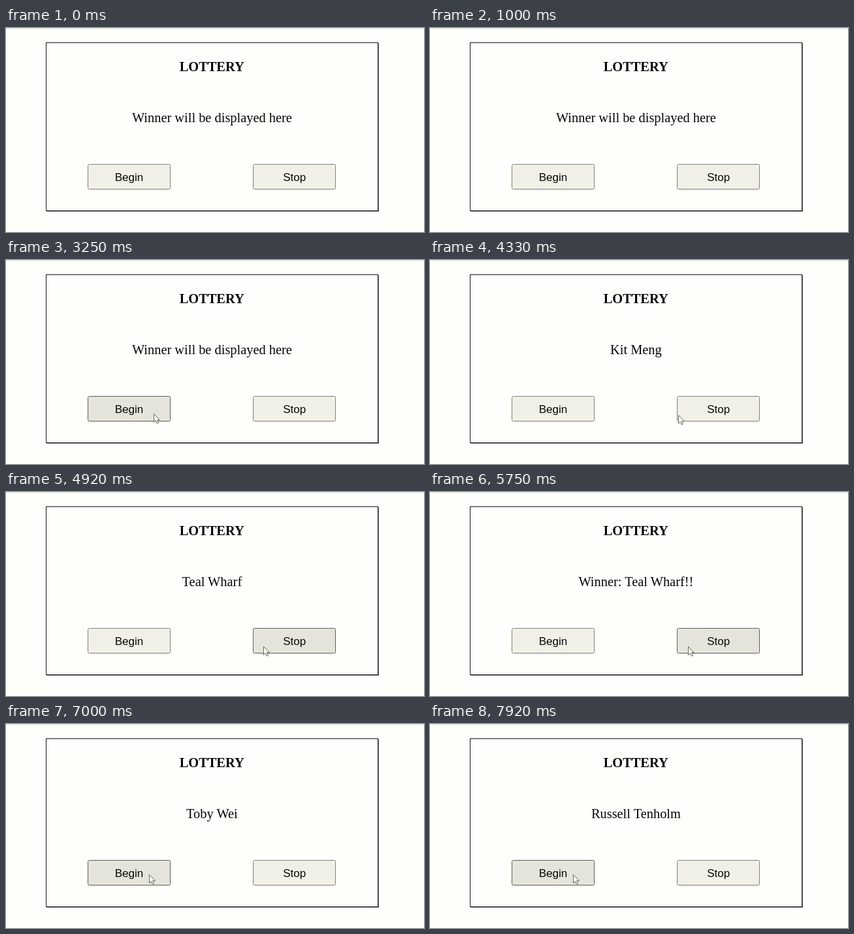
An HTML page for the animation above (8000 ms loop, 640 by 312 pixels).

```html
<!DOCTYPE html>
<html lang="en">
<head>
<meta charset="utf-8">
<title>Lottery</title>
<style>
  html, body { margin: 0; width: 100%; height: 100%; overflow: hidden; background: #fefefb; }
  svg { display: block; width: 640px; height: 312px; }
  text { text-anchor: middle; fill: #060606; }
  .serif { font: 20.4px "Liberation Serif", "Times New Roman", serif; }
  .title { font-weight: bold; }
  .button text { font: 17px "Liberation Sans", Arial, sans-serif; }
  .button rect { fill: #f0f0e6; stroke: #80807c; }
  .button.hover rect { fill: #e4e4da; stroke: #5f5f5c; }
</style>
</head>
<body>
<svg viewBox="0 0 640 312">
  <rect width="640" height="312" fill="#fefefb"/>
  <rect width="640" height="1" fill="#d3e6d4"/>
  <path d="M63 281.5H571.5V24" fill="none" stroke="#e6e6e2"/>
  <path d="M62 280.5H570.5V23" fill="none" stroke="#8c8c88"/>
  <rect x="61.5" y="22.5" width="508" height="257" fill="#fefefb" stroke="#181816"/>
  <text class="serif title" x="315.2" y="66">LOTTERY</text>
  <text class="serif" id="message" x="315.4" y="144"></text>
  <g class="button" id="begin">
    <rect x="125.5" y="208.5" width="126" height="38" rx="2"/>
    <text x="188.5" y="234">Begin</text>
  </g>
  <g class="button" id="stop">
    <rect x="378.5" y="208.5" width="126" height="38" rx="2"/>
    <text x="441.7" y="234">Stop</text>
  </g>
  <path id="cursor" d="M.5 .5V13.2L3.3 10.5L5.4 15L7.5 14L5.5 9.7H9.3Z"
        fill="#fffffb" stroke="#55554c" stroke-width=".9" stroke-linejoin="round"/>
</svg>
<script>
const LOOP = 8000;
const STEPS_PER_MS = 12 / 1000;
const names = ["Russell Tenholm", "Toby Wei", "Teal Wharf", "Kit Meng"];

// Times below are in twelfths of a second.
const path = [
  [36, 262, 278], [37, 255, 277], [39, 226, 235], [41, 224, 236],
  [43, 246, 258], [45, 300, 267], [48, 345, 256], [51, 374, 240],
  [52, 380, 237], [53, 394, 236], [69, 395, 236], [71, 372, 238],
  [75, 236, 234], [77, 219, 230]
];
const firstRoll = 41, winnerShown = 61, secondRoll = 79;

const get = id => document.getElementById(id);
const message = get("message"), begin = get("begin");
const stop = get("stop"), cursor = get("cursor");

function cursorAt(step) {
  const next = path.findIndex(point => point[0] > step);
  if (next < 0) return path[path.length - 1].slice(1);
  const [s0, x0, y0] = path[next - 1];
  const [s1, x1, y1] = path[next];
  const k = (step - s0) / (s1 - s0);
  return [x0 + (x1 - x0) * k, y0 + (y1 - y0) * k].map(Math.round);
}

function messageAt(step) {
  if (step < firstRoll) return "Winner will be displayed here";
  if (step >= winnerShown && step < secondRoll) return `Winner: ${names[2]}!!`;
  return names[(step + (step >> 4)) % names.length];
}

function draw(time) {
  let step = Math.floor((time % LOOP) * STEPS_PER_MS + 0.05);
  if (step % 4 === 2) step--; // every fourth step holds the picture

  message.textContent = messageAt(step);
  begin.classList.toggle("hover", (step >= 39 && step < 43) || step >= 75);
  stop.classList.toggle("hover", step >= 53 && step < 71);

  const visible = step >= path[0][0];
  cursor.style.display = visible ? "" : "none";
  if (visible) cursor.setAttribute("transform", `translate(${cursorAt(step)})`);
}

const start = performance.now();
function tick() {
  draw(performance.now() - start);
  requestAnimationFrame(tick);
}
tick();
</script>
</body>
</html>
```
